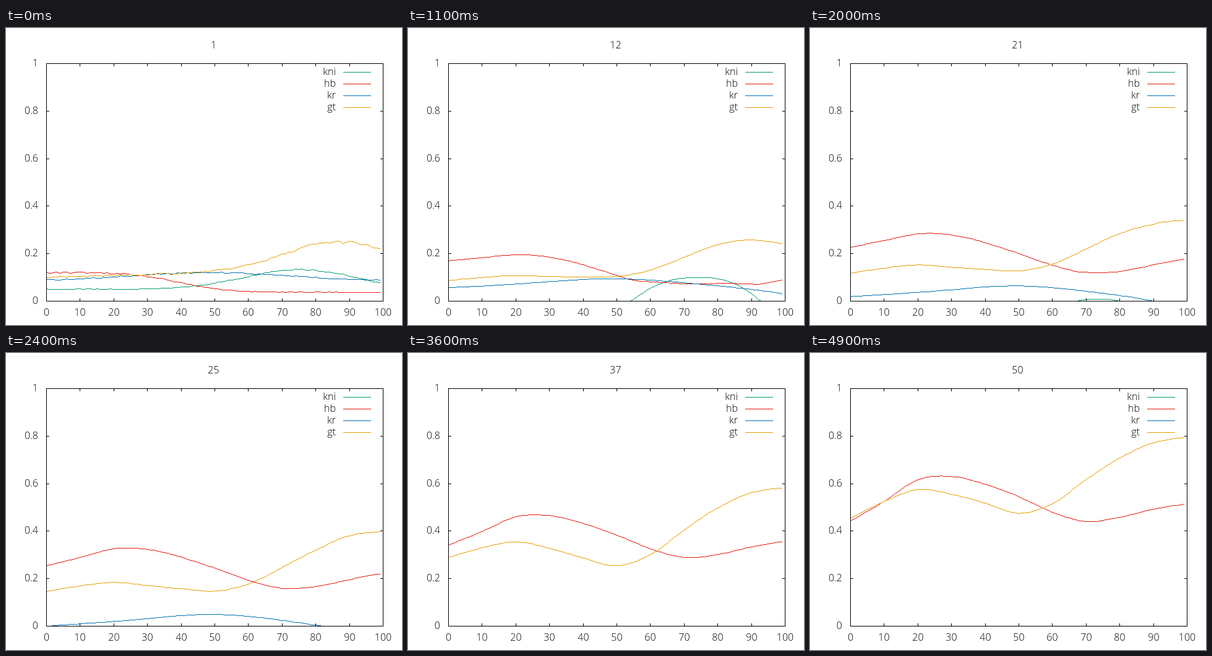
These frames come from a looping animation (640 by 480 pixels, 5 s). An HTML page with a canvas:

```html
<!DOCTYPE html>
<html lang="en">
<head>
<meta charset="utf-8">
<title>Gene levels</title>
<style>
html, body { margin: 0; width: 100%; height: 100%; overflow: hidden; background: #fff; }
canvas { display: block; }
</style>
</head>
<body>
<canvas id="plot" width="640" height="480"></canvas>
<script>
const ctx = document.getElementById('plot').getContext('2d');
const LEFT = 65, RIGHT = 609, TOP = 57, BOTTOM = 441;
const STEP = 100, STEPS = 50;

const bump = (x, center, width, power = 2) =>
  Math.exp(-Math.pow(Math.abs(x - center) / width, power));

// Smooth curve through evenly spaced key points.
function curve(gap, keys) {
  const at = i => i < 0 ? 2 * keys[0] - keys[1]
    : i < keys.length ? keys[i]
    : 2 * keys[keys.length - 1] - keys[keys.length - 2];
  return x => {
    const i = Math.floor(x / gap), u = x / gap - i;
    const a = at(i - 1), b = at(i), c = at(i + 1), d = at(i + 2);
    return b + u / 2 * (c - a + u * (2 * a - 5 * b + 4 * c - d + u * (3 * (b - c) + d - a)));
  };
}

// kni and kr fade out, each place after its own number of steps.
const kniStart = x => 0.05 + 0.084 * bump(x, 75, 23);
const kniLife = x => 9 + 11.6 * bump(x, 73.5, 16, 3);
const krStart = x => 0.085 + 0.035 * bump(x, 48, 33);
const krLife = curve(25, [24, 29.5, 36, 27, 15]);
const age = (step, life) => Math.min(1, (step - 1) / life);

// hb and gt grow, held back while kni or kr is still present.
const hbStart = x => 0.037 + 0.084 / (1 + Math.exp((x - 39.5) / 7));
const hbEnd = curve(10, [0.442, 0.526, 0.616, 0.63, 0.597, 0.545, 0.48, 0.44, 0.458, 0.493, 0.515]);
const gtStart = x => 0.1 + 0.0004 * x + 0.115 * bump(x, 86, 22);
const gtEnd = curve(10, [0.455, 0.525, 0.575, 0.555, 0.518, 0.475, 0.516, 0.617, 0.708, 0.772, 0.797]);

function grow(start, end, loss, held, step) {
  const p = Math.pow((step - 1) / (STEPS - 1), 1.2);
  return start + (end - start + loss) * p - loss * held;
}

const genes = [
  {
    name: 'kni', color: '#009e73',
    level: (x, n) => kniStart(x) * (1 - Math.pow(age(n, kniLife(x)), 2.2))
  },
  {
    name: 'hb', color: '#e51e10',
    level: (x, n) => grow(hbStart(x), hbEnd(x), kniStart(x) - 0.045, age(n, kniLife(x)), n)
  },
  {
    name: 'kr', color: '#0072b2',
    level: (x, n) => krStart(x) * (1 - Math.pow(age(n, krLife(x)), 1.3))
  },
  {
    name: 'gt', color: '#e69f00',
    level: (x, n) => {
      const life = krLife(x);
      const held = 1 - Math.pow(1 - age(n, life), 1.35);
      return grow(gtStart(x), gtEnd(x), 0.085 * krStart(x) * life, held, n);
    }
  }
];

function noise(seed) {
  const s = Math.sin(seed * 12.9898) * 43758.5453;
  return 2 * (s - Math.floor(s)) - 1;
}

function drawCurve(gene, index, step) {
  const jitter = 0.025 * Math.exp((1 - step) / 3);
  ctx.fillStyle = gene.color;
  let px, py;
  for (let i = 0; i < 100; i++) {
    const level = gene.level(i, step) * (1 + jitter * noise(i + 1 + index * 131));
    const x = Math.round(LEFT + i * 5.44);
    const y = Math.round(BOTTOM - level * (BOTTOM - TOP));
    for (let c = px; c <= x; c++) {
      ctx.fillRect(c, Math.round(py + (y - py) * (c - px) / (x - px)), 1, 1);
    }
    px = x;
    py = y;
  }
}

function text(str, x, y, align) {
  ctx.textAlign = align;
  ctx.fillText(str, x, y);
}

function drawFrame() {
  ctx.fillStyle = '#000';
  ctx.fillRect(LEFT, TOP, RIGHT - LEFT + 1, 1);
  ctx.fillRect(LEFT, BOTTOM, RIGHT - LEFT + 1, 1);
  ctx.fillRect(LEFT, TOP, 1, BOTTOM - TOP + 1);
  ctx.fillRect(RIGHT, TOP, 1, BOTTOM - TOP + 1);
  for (let i = 0; i <= 10; i++) {
    const x = Math.round(LEFT + i * 54.4);
    ctx.fillRect(x, TOP, 1, 5);
    ctx.fillRect(x, BOTTOM - 4, 1, 5);
    text(i * 10, x + 0.5, 465, 'center');
  }
  for (let i = 0; i <= 5; i++) {
    const y = Math.round(BOTTOM - i * 76.8);
    ctx.fillRect(LEFT, y, 5, 1);
    ctx.fillRect(RIGHT - 4, y, 5, 1);
    text(i / 5, 52, y + 5, 'right');
  }
}

function draw(step) {
  ctx.fillStyle = '#fff';
  ctx.fillRect(0, 0, 640, 480);
  ctx.font = '300 16px "Open Sans", "Noto Sans", sans-serif';
  genes.forEach((gene, i) => {
    const y = 71 + i * 19;
    drawCurve(gene, i, step);
    ctx.fillRect(545, y, 45, 1);
    ctx.fillStyle = '#000';
    text(gene.name, 533, y + 5, 'right');
  });
  drawFrame();
  text(step, 335.5, 33, 'center');
}

function tick() {
  draw(Math.floor(performance.now() / STEP) % STEPS + 1);
  requestAnimationFrame(tick);
}
tick();
</script>
</body>
</html>
```
